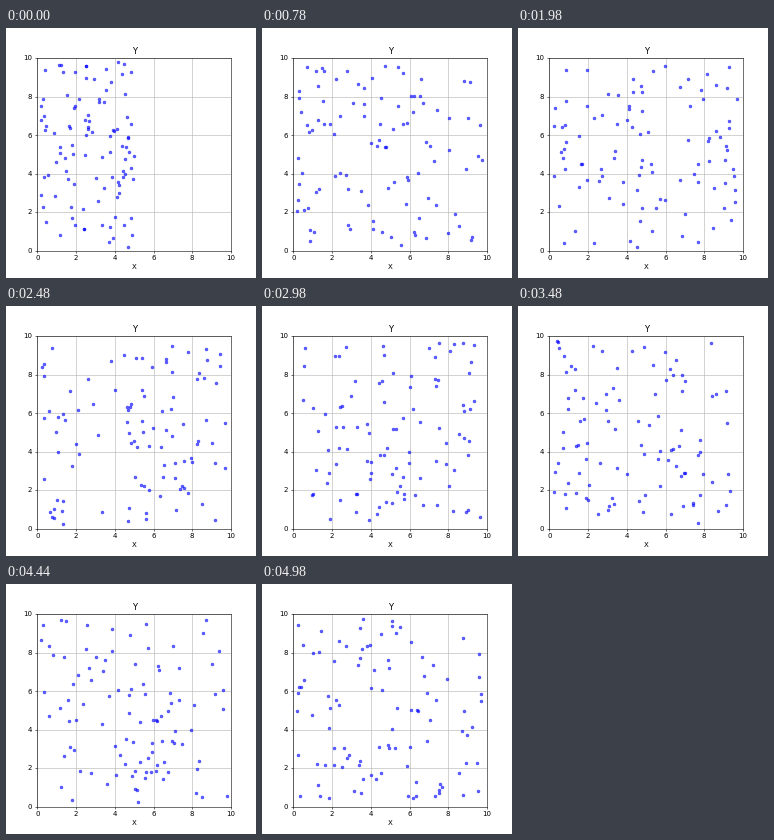
These frames come from a looping animation (250x250 px, 5000 ms). A matplotlib script:

```python
import numpy as np
import matplotlib.pyplot as plt
from matplotlib.animation import FuncAnimation

COUNT = 100
FRAMES = 250
SIZE = 10
WALL = 0.2
SPEED = 0.11

rng = np.random.default_rng(4)
start = rng.uniform(0, 1, (COUNT, 2)) * (SIZE / 2, SIZE)
start = np.clip(start, WALL, SIZE - WALL)
step = rng.normal(0, SPEED, (COUNT, 2))


def bounce(pos):
    """Fold free paths back into the box."""
    span = SIZE - 2 * WALL
    return WALL + span - np.abs((pos - WALL) % (2 * span) - span)


fig, ax = plt.subplots(figsize=(5, 5), dpi=50)
ax.set(xlim=(0, SIZE), ylim=(0, SIZE), title="Y", xlabel="X")
ax.grid(True)
dots, = ax.plot([], [], "o", color="blue", markersize=4, alpha=0.6)


def update(i):
    dots.set_data(*bounce(start + step * i).T)
    return dots,


anim = FuncAnimation(fig, update, frames=FRAMES, interval=20,
                     repeat=True, repeat_delay=0)
plt.show()
```
